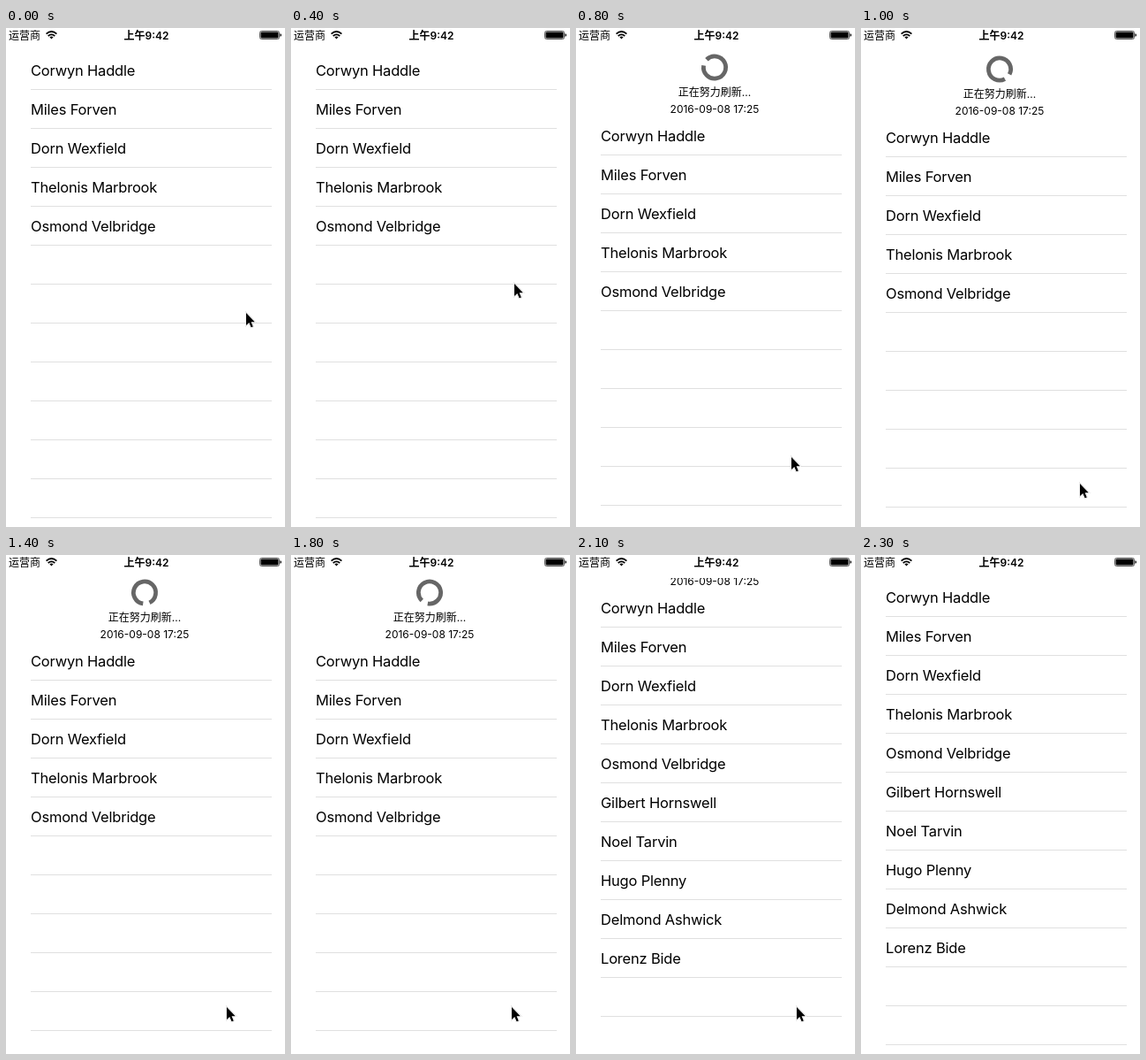
Recreate the animation shown at these times as an HTML page. Size 316 by 564 pixels, loop 2400 ms.

```html
<!DOCTYPE html>
<html lang="zh">
<head>
<meta charset="utf-8">
<title>Pull to refresh</title>
<style>
  html, body { margin: 0; width: 100%; height: 100%; overflow: hidden; background: #fff; }
  svg { display: block; width: 316px; height: 564px; }
  text { font-family: Inter, "Noto Sans CJK SC", "Noto Sans CJK", sans-serif; fill: #000; white-space: pre; }
  .row { font-size: 16.5px; letter-spacing: -.2px; }
  .small { font-size: 12px; }
  .mid { text-anchor: middle; }
  .clock { font-weight: 600; }
</style>
</head>
<body>
<svg viewBox="0 0 316 564" xmlns="http://www.w3.org/2000/svg">
  <defs><clipPath id="table"><rect y="26" width="316" height="538"/></clipPath></defs>

  <g id="status">
    <text class="small" x="3" y="12.5">运营商</text>
    <g fill="none" stroke="#000" stroke-width="1.7">
      <path d="M45.6 6.7Q51.5 1.3 57.4 6.7"/>
      <path d="M47.7 9Q51.5 5.6 55.3 9"/>
    </g>
    <path d="M49.4 10.3Q51.5 8.6 53.6 10.3L51.5 12.5Z"/>
    <text class="small mid clock" x="159" y="12.5">上午9:42</text>
    <rect x="287.5" y="3.5" width="22" height="9" rx="2" fill="none" stroke="#555"/>
    <rect x="288.5" y="4.5" width="20" height="7" rx="1"/>
    <path d="M310.5 6.2Q312 6.5 312 8T310.5 9.8Z"/>
  </g>

  <g clip-path="url(#table)">
    <g id="content">
      <path id="ring" fill="none" stroke="#666" stroke-width="4.8"/>
      <text class="small mid" x="157" y="2.5">正在努力刷新...</text>
      <text class="small mid" x="157" y="22">2016-09-08 17:25</text>
      <g id="rows"></g>
    </g>
  </g>

  <path id="cursor" d="M0 0V14L3.3 11L5.6 16.3L7.8 15.4L5.6 10.2H9.8Z"
        stroke="#fff" stroke-width="1.6" paint-order="stroke"
        style="filter:drop-shadow(0 .8px .7px rgba(0,0,0,.4))"/>
</svg>
<script>
const STEP = 100, STEPS = 24, ROW = 44, FIRST_LINE = 69, LINES = 12;
const INITIAL = 5, LOADED_AT = 19, CURSOR_GONE = 23;
const people = ["Corwyn Haddle", "Miles Forven", "Dorn Wexfield", "Thelonis Marbrook",
  "Osmond Velbridge", "Gilbert Hornswell", "Noel Tarvin", "Hugo Plenny",
  "Delmond Ashwick", "Lorenz Bide"];

// [step, value...]
const pull = [[0, 0], [5, 0], [6, 28], [7, 65], [8, 74], [9, 76], [10, 76], [11, 73],
  [12, 72], [18, 72], [19, 60], [20, 35], [21, 12], [22, 0]];
const pointer = [[0, 272, 321], [4, 253, 288], [5, 251, 290], [6, 246, 352], [7, 242, 435],
  [8, 244, 484], [9, 247, 508], [10, 248, 514], [11, 249, 512], [12, 249, 510], [13, 250, 510]];

const $ = id => document.getElementById(id);

function add(parent, tag, attrs, text = "") {
  const el = document.createElementNS("http://www.w3.org/2000/svg", tag);
  for (const key in attrs) el.setAttribute(key, attrs[key]);
  el.textContent = text;
  return parent.appendChild(el);
}

function sample(keys, step, col = 1) {
  const i = keys.findIndex(k => k[0] >= step);
  if (i < 0) return keys[keys.length - 1][col];
  if (i === 0) return keys[0][col];
  const a = keys[i - 1], b = keys[i];
  return Math.round(a[col] + (b[col] - a[col]) * (step - a[0]) / (b[0] - a[0]));
}

for (let i = 0; i < LINES; i++)
  add($("rows"), "rect", { x: 28, y: FIRST_LINE + ROW * i, width: 273, height: 1, fill: "#e0e0e0" });
const labels = people.map((name, i) =>
  add($("rows"), "text", { class: "row", x: 28, y: 53.5 + ROW * i }, name));

// Open ring, gap at the top
const R = 12.6, gap = 17 * Math.PI / 180;
const gx = R * Math.sin(gap), gy = -R * Math.cos(gap);
$("ring").setAttribute("d", `M${gx} ${gy}A${R} ${R} 0 1 1 ${-gx} ${gy}`);

function draw(step) {
  $("content").setAttribute("transform", `translate(0 ${sample(pull, step)})`);
  // Rows move with the content; the header sits above the first row
  $("ring").setAttribute("transform", `translate(157 -29.5) rotate(${135 - 81 * (step - 10)})`);
  labels.forEach((el, i) =>
    el.setAttribute("visibility", i < INITIAL || step >= LOADED_AT ? "visible" : "hidden"));
  $("cursor").setAttribute("transform",
    `translate(${sample(pointer, step, 1)} ${sample(pointer, step, 2) + 1})`);
  $("cursor").setAttribute("visibility", step < CURSOR_GONE ? "visible" : "hidden");
}

const start = performance.now();
function tick() {
  draw(Math.floor(Math.max(0, performance.now() - start) / STEP) % STEPS);
  requestAnimationFrame(tick);
}
tick();
</script>
</body>
</html>
```
